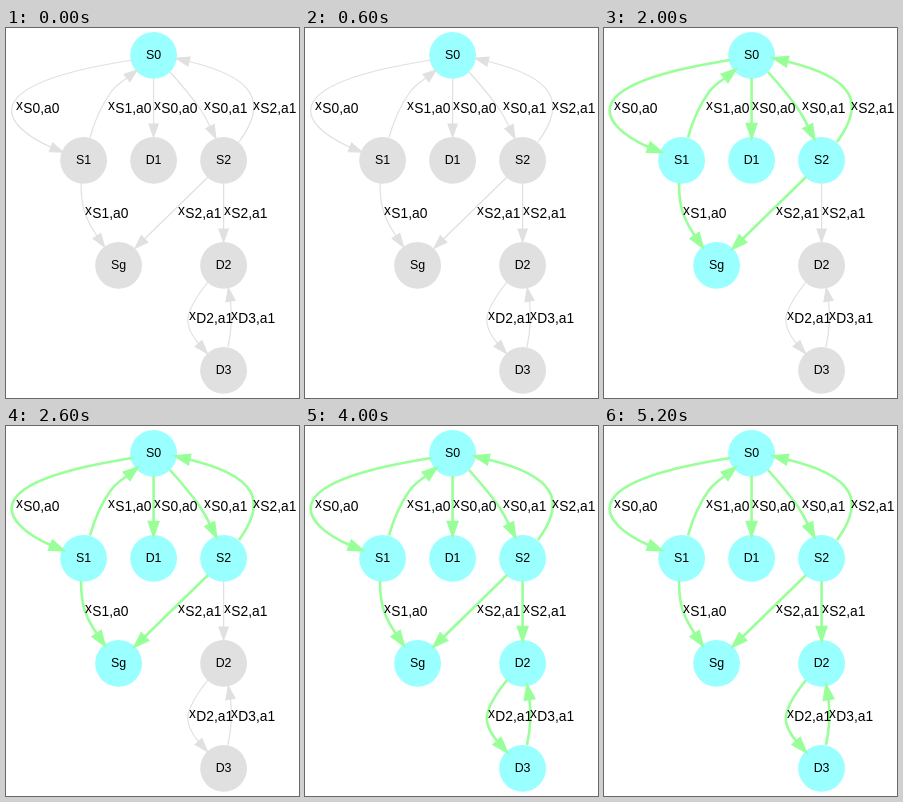
Write an HTML page that moves like this. It is 293 by 370 pixels and loops after 6 s.

```html
<!DOCTYPE html>
<html lang="en">
<head>
<meta charset="utf-8">
<title>Reachable states</title>
<style>
html, body { margin: 0; width: 100%; height: 100%; overflow: hidden; background: #fff; }
svg { display: block; width: 293px; height: 370px; }
text { font-family: "Liberation Sans", Arial, sans-serif; font-size: 13.8px; }
.name { font-size: 12.4px; text-anchor: middle; }
.node { fill: #e0e0e0; }
.node.on { fill: #9ff; }
.edge { stroke: #e0e0e0; fill: #e0e0e0; stroke-width: 1.2; }
.edge.on { stroke: #9f9; fill: #9f9; stroke-width: 2.6; }
.edge path { fill: none; }
</style>
</head>
<body>
<svg id="stage" viewBox="0 0 293 370"></svg>
<script>
const stage = document.getElementById("stage");
const parts = [];

function add(parent, tag, attrs, text = "") {
  const el = document.createElementNS("http://www.w3.org/2000/svg", tag);
  for (const key in attrs) el.setAttribute(key, attrs[key]);
  el.textContent = text;
  return parent.appendChild(el);
}

// step: the second at which the part lights up
function node(name, x, y, step) {
  const el = add(stage, "circle", { class: "node", cx: x, cy: y, r: 23.4 });
  add(stage, "text", { class: "name", x, y: Math.floor(y) + 4 }, name);
  parts.push({ el, step });
}

// (bx, by) is the base of the arrowhead, (tx, ty) its tip
function edge(step, curve, bx, by, tx, ty) {
  const el = add(stage, "g", { class: "edge" });
  const len = Math.hypot(tx - bx, ty - by);
  const nx = (by - ty) / len * 4.6, ny = (tx - bx) / len * 4.6;
  add(el, "path", { d: `${curve} ${bx},${by}` });
  add(el, "polygon", { points: [bx + nx, by + ny, tx, ty, bx - nx, by - ny] });
  parts.push({ el, step });
}

function label(sub, x, y) {
  add(stage, "text", { x, y }, "x");
  add(stage, "text", { x: x + 7.3, y: y + 3 }, sub);
}

node("S0", 147.6, 27.4, 0);
node("S1", 77.6, 132.4, 1);
node("D1", 147.6, 132.4, 1);
node("S2", 217.6, 132.4, 1);
node("Sg", 112.6, 237.4, 2);
node("D2", 217.6, 237.4, 3);
node("D3", 217.6, 342.4, 4);

edge(1, "M126,32 C89,38 22,50 8,74 C-2,92 22,109", 45, 119.3, 57, 124);
edge(1, "M84,109.5 C88,95 95,78 105,64 C109,58.5 115,54", 121, 50, 131, 42);
edge(1, "M147.6,50 L", 147.6, 96, 147.6, 109);
edge(1, "M164,44 C173,54 185,68 193.5,80 C197.5,86 201,92", 204, 98.5, 210, 110.5);
edge(1, "M233,114 C244,99 253,80 244,65 C234,48 206,39", 183, 33.5, 170, 30.3);
edge(2, "M75,155 C75,166 76,179 80.5,189 C83,195 87,202", 91, 208, 98.5, 219);
edge(2, "M202,149 L", 138.5, 211, 129, 220.3);
edge(3, "M217.6,155 L", 217.6, 201, 217.6, 214);
edge(4, "M202,254 C194,264 185,276 182.3,288 C180,298 185.5,307", 192.5, 315.5, 201.5, 325.5);
edge(4, "M222,319 C225,305 226.5,290", 224.5, 273, 222.3, 260);

label("S0,a0", 10, 82);
label("S1,a0", 102, 82);
label("S0,a0", 148, 82);
label("S0,a1", 198, 82);
label("S2,a1", 247, 82);
label("S1,a0", 79, 187);
label("S2,a1", 172, 187);
label("S2,a1", 218, 187);
label("D2,a1", 183, 292);
label("D3,a1", 225, 292);

const start = performance.now();
function draw() {
  const seconds = (performance.now() - start) % 6000 / 1000;
  for (const { el, step } of parts) el.classList.toggle("on", seconds >= step);
  requestAnimationFrame(draw);
}
draw();
</script>
</body>
</html>
```
